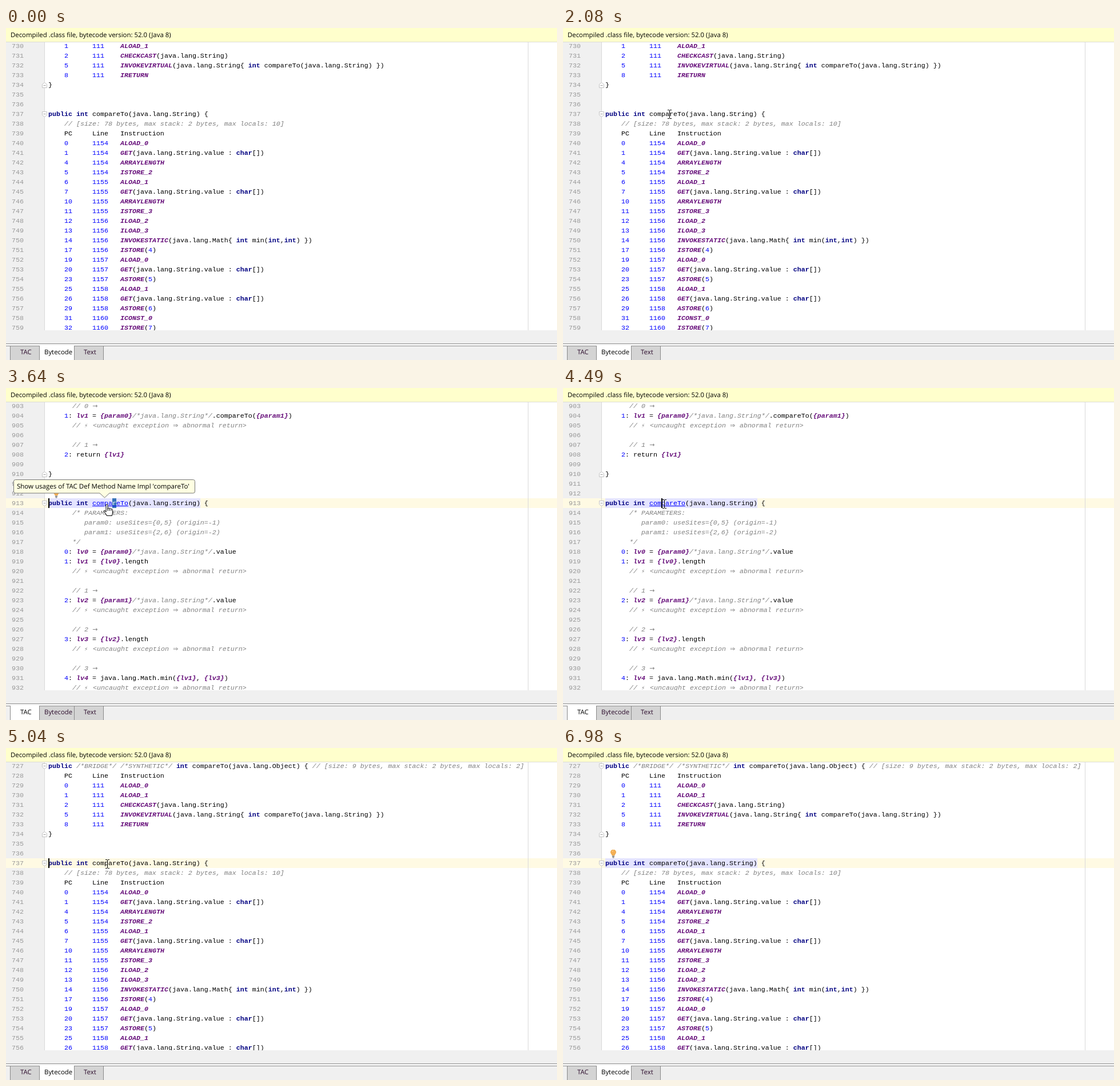
An HTML page that plays this animation: 964x581 px, repeating every 7.46 s.

```html
<!DOCTYPE html>
<html lang="en">
<head>
<meta charset="utf-8">
<title>Bytecode and TAC viewer</title>
<style>
  html, body { margin: 0; width: 100%; height: 100%; overflow: hidden; background: #f0f0f0; }
  body { position: relative; font: 11.4px "Open Sans", "Noto Sans", sans-serif; color: #000; text-rendering: geometricPrecision; }
  div, svg { position: absolute; }
  .ui { white-space: pre; line-height: 16px; }

  #header { left: 0; top: 0; width: 964px; height: 24px; background: #ffffcc; border-bottom: 1px solid #dcdcd2; }
  #header .ui { left: 8px; top: 5px; }

  #editor { left: 0; top: 0; width: 964px; height: 581px; clip-path: inset(25px 0 52px 0); background: #fff; }
  #gutter { left: 0; top: 0; width: 67px; height: 581px; background: #f0f0f0; }
  .rule { top: 0; width: 1px; height: 581px; background: #d9d9d9; }
  .mark { top: 193px; height: 17px; }
  #band { left: 0; width: 964px; background: #fffae3; }
  #sig { left: 74px; width: 266px; background: #e4e4ff; }
  #word { left: 151px; width: 63px; background: #e4e4ff; }
  #sel { left: 186px; width: 7px; background: #3874b8; }
  .caret { width: 2px; background: #000; }

  .view { left: 0; top: 23px; width: 964px; font: 11.667px/17px "Liberation Mono", "Courier New", monospace; text-rendering: auto; }
  .row { left: 0; width: 964px; height: 17px; }
  .row > span { position: absolute; top: 1px; white-space: pre; }
  .no { left: 10px; color: #999; }
  .code { left: 74px; }
  .row svg { left: 63px; top: 4px; }
  .c { color: #808080; font-style: italic; }
  .v { color: #660e7a; font-style: italic; font-weight: bold; }
  .k { color: #000080; font-weight: bold; }
  .d { color: #0000ff; }
  .sym { display: inline-block; width: 10px; font: normal 11px/0 "DejaVu Sans", sans-serif; }
  .bolt { width: 8px; font-size: 9px; }
  #link { text-decoration: underline transparent; }

  .line { left: 0; width: 964px; height: 1px; background: #909090; }
  .tab { top: 556px; height: 24px; border-top: 1px solid #909090; background: #d4d4d4; color: #2c0c2c; }
  .tab .ui { top: 3px; }
  .edge { top: 556px; width: 1px; height: 25px; background: #8a8a8a; }
  #tip .ui { left: 19px; top: 165px; font-size: 11.5px; }
</style>
</head>
<body>
<div id="header"><div class="ui">Decompiled .class file, bytecode version: 52.0 (Java 8)</div></div>

<div id="editor">
  <div id="gutter"></div>
  <div class="mark" id="band"></div>
  <div class="rule" style="left:67px"></div>
  <div class="rule" style="left:913px"></div>
  <div class="mark" id="sig"></div>
  <div class="mark" id="word"></div>
  <div class="mark" id="sel"></div>
  <div class="view" id="bytecode"></div>
  <div class="view" id="tac"></div>
  <div class="mark caret" id="caretStart" style="left:74px"></div>
  <div class="mark caret" id="caretWord" style="left:172px"></div>
  <svg id="bulb" style="left:83px;top:178px" width="10" height="15">
    <path d="M2.8 10Q2.8 8.6 1.4 7.2A4.6 4.6 0 1 1 8.6 7.2Q7.2 8.6 7.2 10Z" fill="#f4af55" stroke="#dc9a40" stroke-width=".6"/>
    <path d="M3 3.5Q3.6 2 5 1.8" fill="none" stroke="#ffe0a6"/>
    <path d="M3 11H7M3 12.5H7M3.7 14H6.3" stroke="#6e6e6e"/>
  </svg>
</div>

<div class="line" style="top:552px"></div>
<div class="line" style="top:553px;height:3px;background:#f8f8f8"></div>
<div class="line" style="top:556px"></div>
<div class="tab" id="tabTac" style="left:8px;width:50px"><div class="ui" style="left:17px">TAC</div></div>
<div class="tab" id="tabByte" style="left:59px;width:60px"><div class="ui" style="left:8px">Bytecode</div></div>
<div class="tab" style="left:120px;width:50px"><div class="ui" style="left:16px">Text</div></div>
<div class="edge" style="left:7px"></div>
<div class="edge" style="left:58px"></div>
<div class="edge" style="left:119px"></div>
<div class="edge" style="left:170px"></div>

<div id="tip">
  <svg width="340" height="200">
    <path d="M16.5 160.5H327.5Q330.5 160.5 330.5 163.5V181Q330.5 184 327.5 184H181L172.5 192L164 184H16.5Q13.5 184 13.5 181V163.5Q13.5 160.5 16.5 160.5Z" fill="#fefee2" stroke="#777"/>
  </svg>
  <div class="ui">Show usages of TAC Def Method Name Impl 'compareTo'</div>
</div>

<div id="mouse" style="left:0;top:0">
  <svg id="arrow" width="14" height="21" overflow="visible">
    <path d="M.5 .5V16.5L4.2 13L6.7 18.8L9 17.8L6.5 12.1H11.8Z" fill="#fff" stroke="#000"/>
  </svg>
  <svg id="beam" width="1" height="1" overflow="visible">
    <path d="M-3 -7.5H0M1 -7.5H4M.5 -7V7M-3 7.5H0M1 7.5H4" fill="none" stroke="#000"/>
  </svg>
  <svg id="hand" width="1" height="1" overflow="visible">
    <path d="M-2 14V2Q-2 .5 -.5 .5T1 2V8.5Q1 7 2.5 7T4 8.5Q4.2 7.5 5.5 7.7T7 9.2Q7.2 8.6 8.4 8.8T9.5 10.5V15Q9.5 17 8.5 18.5V20.5H-1V19Q-3 16.5 -5.5 13Q-6 11 -4.5 11Z" fill="#fff" stroke="#000"/>
    <path d="M1 8V12M4 8.5V12M7 9.5V12" stroke="#000"/>
  </svg>
</div>

<script>
const LOOP = 7460;
const $ = id => document.getElementById(id);

// Code listings; a leading ~ makes the whole line a comment.
const instr = text => text.trim().split('\n').map(line => {
  const [pc, no, ...op] = line.trim().split(' ');
  return '    ' + pc.padEnd(7) + no.padEnd(7) + op.join(' ');
}).join('\n');
const head = '    PC     Line   Instruction';
const sig = 'public int compareTo(java.lang.String) {';
const getValue = 'GET(java.lang.String.value : char[])';

const bytecode = `public /*BRIDGE*/ /*SYNTHETIC*/ int compareTo(java.lang.Object) { // [size: 9 bytes, max stack: 2 bytes, max locals: 2]
${head}
${instr(`0 111 ALOAD_0
  1 111 ALOAD_1
  2 111 CHECKCAST(java.lang.String)
  5 111 INVOKEVIRTUAL(java.lang.String{ int compareTo(java.lang.String) })
  8 111 IRETURN`)}
}


${sig}
    // [size: 78 bytes, max stack: 2 bytes, max locals: 10]
${head}
${instr(`0 1154 ALOAD_0
  1 1154 ${getValue}
  4 1154 ARRAYLENGTH
  5 1154 ISTORE_2
  6 1155 ALOAD_1
  7 1155 ${getValue}
  10 1155 ARRAYLENGTH
  11 1155 ISTORE_3
  12 1156 ILOAD_2
  13 1156 ILOAD_3
  14 1156 INVOKESTATIC(java.lang.Math{ int min(int,int) })
  17 1156 ISTORE(4)
  19 1157 ALOAD_0
  20 1157 ${getValue}
  23 1157 ASTORE(5)
  25 1158 ALOAD_1
  26 1158 ${getValue}
  29 1158 ASTORE(6)
  31 1160 ICONST_0
  32 1160 ISTORE(7)`)}`;

const abrupt = '      // ⚡ <uncaught exception ⇒ abnormal return>';
const tac = `      // 0 →
    1: lv1 = {param0}/*java.lang.String*/.compareTo({param1})
${abrupt}

      // 1 →
    2: return {lv1}

}


${sig}
~      /* PARAMETERS:
~         param0: useSites={0,5} (origin=-1)
~         param1: useSites={2,6} (origin=-2)
~      */
    0: lv0 = {param0}/*java.lang.String*/.value
    1: lv1 = {lv0}.length
${abrupt}

      // 1 →
    2: lv2 = {param1}/*java.lang.String*/.value
${abrupt}

      // 2 →
    3: lv3 = {lv2}.length
${abrupt}

      // 3 →
    4: lv4 = java.lang.Math.min({lv1}, {lv3})
${abrupt}`;

const token = /(~.*|\/\/.*|\/\*.*?\*\/)|(\{?(?:lv|param)\d\}?|[A-Z]{3,}\w*)|(\b(?:public|int|char)\b)|(\b\d+\b)/g;

const paint = line => line.replace(/</g, '&lt;')
  .replace(token, (s, comment, name, word) => {
    const kind = comment ? 'c' : name ? 'v' : word ? 'k' : 'd';
    return `<span class="${kind}">${s.replace('~', '')}</span>`;
  })
  .replace('⚡', '<span class="sym bolt">⚡\uFE0E</span>')
  .replace(/[⇒→]/, '<span class="sym">$&</span>');

const fold = line => {
  const closing = line === '}';
  if (!closing && !line.startsWith('public')) return '';
  const flip = closing ? 'transform="matrix(1 0 0 -1 0 10)"' : '';
  return `<svg width="9" height="10"><g ${flip}><path d="M.5.5H8.5V6.5L4.5 9.5L.5 6.5Z" fill="#fff" stroke="#c4c4c4"/>
    <path d="M2.5 4.5H6.5" stroke="#a0a0a0"/></g></svg>`;
};

const list = (text, first) => text.split('\n').map((line, i) =>
  `<div class="row" style="top:${i * 17}px">${fold(line)}<span class="no">${first + i}</span><span class="code">${paint(line)}</span></div>`
).join('');

$('bytecode').innerHTML = list(bytecode, 727);
$('tac').innerHTML = list(tac, 903).replace('int</span> compareTo',
  'int</span> <span id="link">compa<span id="letter">r</span>eTo</span>');

// Timeline: times in ms.
const run = (el, frames) => el.animate(
  frames.map(({ at, ...rest }) => ({ offset: at / LOOP, ...rest })),
  { duration: LOOP, iterations: Infinity });

const track = (id, prop, stops) => run($(id), [...stops, [LOOP, stops[stops.length - 1][1]]]
  .map(([at, value]) => ({ at, [prop]: value, easing: 'step-end' })));

// Hidden at first, then toggled at each time.
const show = (id, ...times) => track(id, 'visibility',
  [[0, 'hidden'], ...times.map((at, i) => [at, i % 2 ? 'hidden' : 'visible'])]);

const TO_TAC = 2240, TO_BYTE = 4950;
show('bytecode', 0, TO_TAC, TO_BYTE);
show('tac', TO_TAC, TO_BYTE);
track('bytecode', 'top', [[0, '-28px'], [TO_TAC, '23px']]);

const idle = { backgroundColor: '#d4d4d4', borderTopColor: '#909090', color: '#2c0c2c' };
const active = { backgroundColor: '#ffffff', borderTopColor: '#ffffff', color: '#000000' };
const tab = (id, a, b) => Object.keys(a).forEach(prop =>
  track(id, prop, [[0, a[prop]], [TO_TAC, b[prop]], [TO_BYTE, a[prop]]]));
tab('tabTac', idle, active);
tab('tabByte', active, idle);

show('band', 2330, TO_BYTE, 5040);
show('sig', 2550, TO_BYTE, 5120);
show('word', 2410, 2550);
show('sel', 2330, 4340);
show('caretStart', 2330, 4340, 5040, 5970, 6480, 6980);
show('caretWord', 4340, TO_BYTE);
show('bulb', 3010, 4340, 5660);
show('tip', 3640, 4340);
track('link', 'color', [[0, '#000000'], [3560, '#0000ff']]);
track('link', 'textDecorationColor', [[0, 'transparent'], [3560, '#0000ff']]);
track('letter', 'color', [[0, '#000000'], [2330, '#ffffff'], [4340, '#0000ff']]);

show('arrow', 440, 519, TO_TAC, 3170, 6593, 6750);
show('beam', 519, TO_TAC, 3170, 3560, 4490, 6593);
show('hand', 3560, 4490);

// Pointer path: time, x, y, number of jumps to the next point.
run($('mouse'), [
  [0, 762, 561, 1], [440, 762, 561, 2], [598, 676, 500, 4], [914, 301, 235, 3],
  [1150, 186, 154, 1], [1220, 186, 152, 1], [1300, 186, 151, 1],
  [TO_TAC, 183, 149, 1], [3170, 185, 152, 5], [3560, 177, 203, 1],
  [5892, 177, 203, 3], [6126, 329, 278, 4], [6438, 783, 502, 3],
  [6670, 935, 577, 1], [LOOP, 935, 577, 1]
].map(([at, x, y, n]) => ({ at, transform: `translate(${x}px, ${y}px)`, easing: `steps(${n}, end)` })));
</script>
</body>
</html>
```
